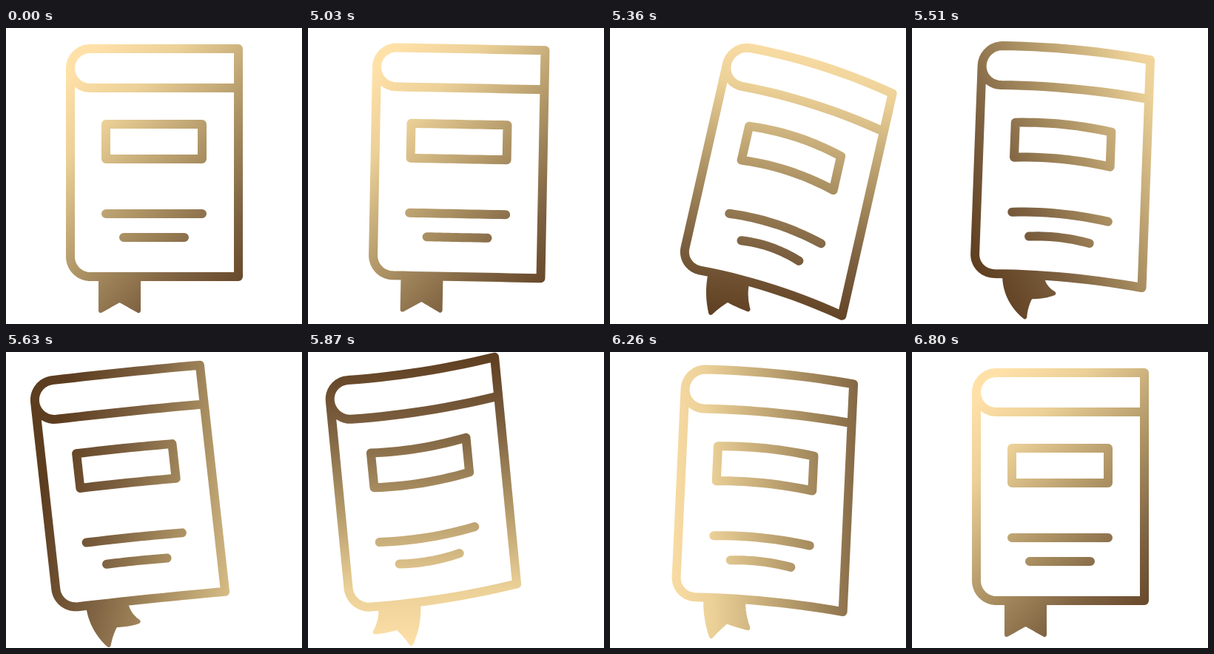
These frames come from a looping animation (400 px wide and 400 px high, 6.83 s). An HTML page:

```html
<!DOCTYPE html>
<html lang="en">
<head>
<meta charset="utf-8">
<title>Swaying book</title>
<style>
  html, body { margin: 0; width: 100%; height: 100%; overflow: hidden; background: #fff; }
  svg { display: block; width: 100vw; height: 100vh; }
</style>
</head>
<body>
<svg viewBox="0 0 400 400">
  <defs>
    <linearGradient id="gold" gradientUnits="userSpaceOnUse">
      <stop offset="0" stop-color="#ffe1a8"/>
      <stop offset=".2" stop-color="#ebd097"/>
      <stop offset=".5" stop-color="#ad9364"/>
      <stop offset=".75" stop-color="#7c6040"/>
      <stop offset="1" stop-color="#5d3d1f"/>
    </linearGradient>
  </defs>
  <g stroke="url(#gold)" stroke-linecap="round" stroke-linejoin="round">
    <path id="ribbon" fill="url(#gold)" stroke-width="6"/>
    <path id="book" fill="none" stroke-width="12"/>
  </g>
</svg>
<script>
const LOOP = 6830, START = 5030, END = 6800, STEP = 30;
const LEFT = 87, RIGHT = 314, BOTTOM = 336;
const PIVOT = { x: 200.5, y: 362 };
const RAD = Math.PI / 180;

// Cosine easing from one [time, value] turning point to the next
function sway(t, points) {
  if (t <= points[0][0]) return points[0][1];
  for (let i = 1; i < points.length; i++) {
    const [t0, a] = points[i - 1], [t1, b] = points[i];
    if (t < t1) return a + (b - a) * (1 - Math.cos(Math.PI * (t - t0) / (t1 - t0))) / 2;
  }
  return points[points.length - 1][1];
}

// The page bend and the ribbon trail behind the tilt
const tilt = t => sway(t, [[4970, 0], [5300, 14], [5700, -8], [6240, 2.7], [END, 0]]);
const slide = t => sway(t, [[5400, 0], [5850, -28], [6240, 0]]);
const bend = t => sway(t, [[START, 0], [5360, 1.05], [5880, -0.72], [6270, 0.64], [END, 0]]);
const swing = t => sway(t, [[START, 0], [5150, -0.2], [5540, 0.8], [5880, -0.43], [6270, 0.3], [END, 0]]);

// The light makes one full turn
function lightAngle(t) {
  const u = Math.min(1, Math.max(0, (t - 5200) / (END - 5200))), v = u ** 0.62;
  return (45 + 360 * v * v * (3 - 2 * v)) * RAD;
}

function poseAt(t) {
  t = t < START ? 0 : Math.min(END, START + Math.floor((t - START) / STEP) * STEP);
  const deg = tilt(t);
  return {
    cos: Math.cos(deg * RAD), sin: Math.sin(deg * RAD),
    dx: slide(t), dy: 11 * (deg / 12.6) ** 3,
    bend: bend(t), swing: swing(t), light: lightAngle(t)
  };
}

// Bends a point across the span x0..x1, then tilts it with the book
function place(p, x, y, x0, x1) {
  const u = (x - x0) / (x1 - x0);
  const lx = x - PIVOT.x;
  const ly = y - PIVOT.y + p.bend * Math.sqrt(x1 - x0) * (2 * u * u - u);
  return [
    PIVOT.x + p.dx + lx * p.cos - ly * p.sin,
    PIVOT.y + p.dy + lx * p.sin + ly * p.cos
  ];
}

// The ribbon hangs from the bottom edge and curls with depth
function placeRibbon(p, x, y) {
  const mid = 153.5, depth = y - BOTTOM, dx = x - mid;
  const turn = p.swing * depth / 49, lean = 0.7 * turn;
  return place(p,
    mid + depth * Math.sin(lean) + dx * Math.cos(turn),
    BOTTOM + depth * Math.cos(lean) - dx * Math.sin(turn), LEFT, RIGHT);
}

function poly(...p) {
  const out = [[p[0], p[1]]];
  for (let i = 2; i < p.length; i += 2)
    for (let j = 1; j <= 14; j++) {
      const f = j / 14;
      out.push([p[i - 2] + (p[i] - p[i - 2]) * f, p[i - 1] + (p[i + 1] - p[i - 1]) * f]);
    }
  return out;
}

function arc(cx, cy, r, from, to) {
  return Array.from({ length: 19 }, (_, i) => {
    const a = (from + (to - from) * i / 18) * RAD;
    return [cx + r * Math.cos(a), cy + r * Math.sin(a)];
  });
}

const SHAPES = [
  [...poly(RIGHT, 28, 113.5, 28), ...arc(113.5, 54.5, 26.5, 270, 90), ...poly(113.5, 81, RIGHT, 81)],
  [...poly(LEFT, 54.5, LEFT, 309), ...arc(114, 309, 27, 180, 90),
    ...poly(114, BOTTOM, RIGHT, BOTTOM, RIGHT, 28)],
  poly(135, 130, 265, 130, 265, 177, 135, 177, 135, 130),
  poly(135, 251, 265, 251),
  poly(159, 283, 241, 283)
].map(points => {
  const xs = points.map(q => q[0]);
  return { points, x0: Math.min(...xs), x1: Math.max(...xs) };
});
const RIBBON = poly(128, 337, 128, 382, 153.5, 367.5, 179, 382, 179, 337);

const trace = (points, fn) =>
  "M" + points.map(([x, y]) => fn(x, y).map(n => n.toFixed(2)).join(" ")).join("L");

const [book, ribbon, gold] = ["book", "ribbon", "gold"].map(id => document.getElementById(id));

function draw(t) {
  const p = poseAt(t);
  const c = Math.cos(p.light), s = Math.sin(p.light);
  const cx = 205 + 50 * c * c, cy = 200, half = 200;
  const ends = { x1: cx - half * c, y1: cy - half * s, x2: cx + half * c, y2: cy + half * s };
  for (const name in ends) gold.setAttribute(name, ends[name].toFixed(2));
  book.setAttribute("d", SHAPES.map(({ points, x0, x1 }) =>
    trace(points, (x, y) => place(p, x, y, x0, x1))).join(""));
  ribbon.setAttribute("d", trace(RIBBON, (x, y) => placeRibbon(p, x, y)) + "Z");
}

const begin = performance.now();
function tick() {
  draw((performance.now() - begin) % LOOP);
  requestAnimationFrame(tick);
}
tick();
</script>
</body>
</html>
```
